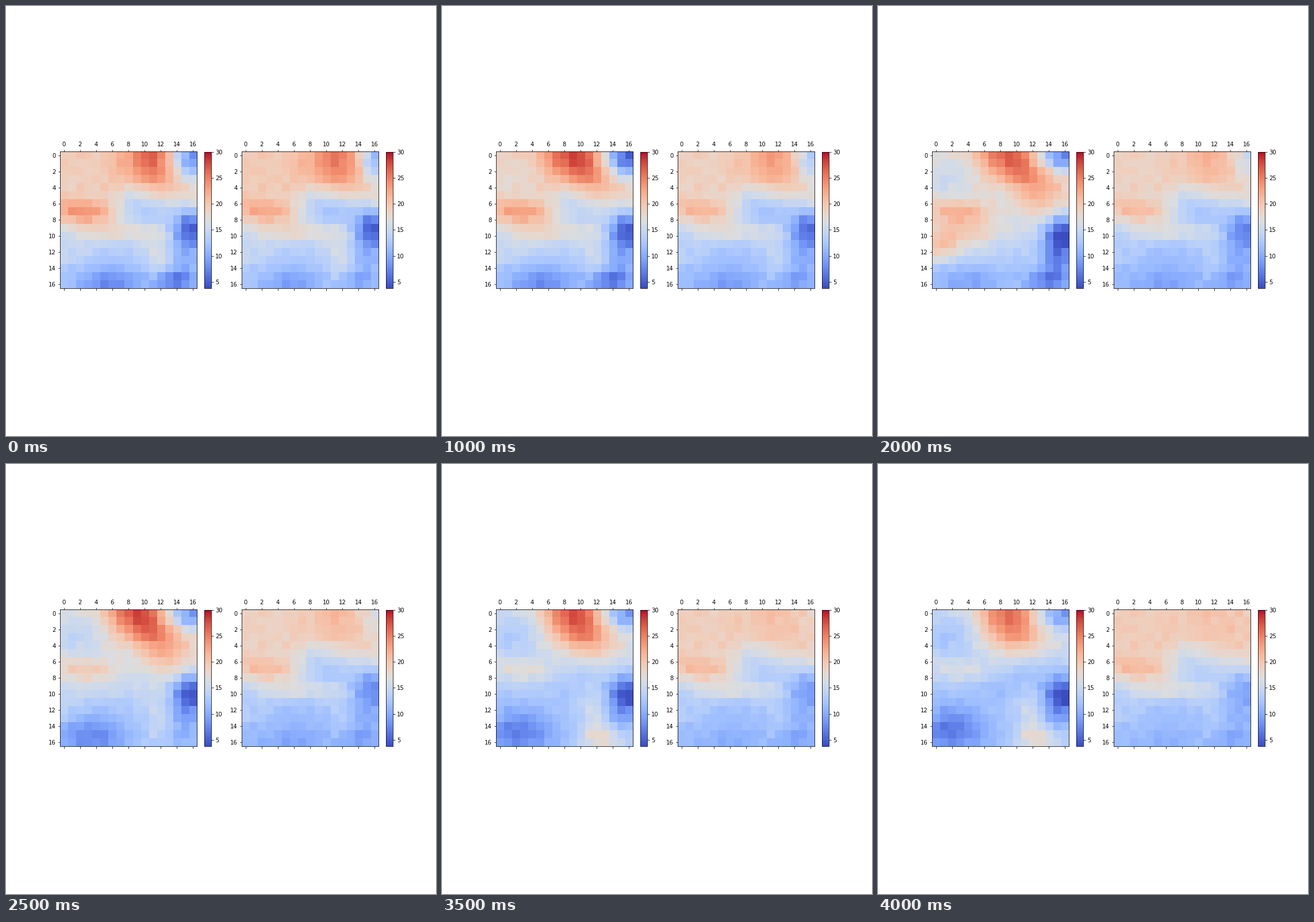
A matplotlib script for the animation above (4500 ms loop, 748 by 748 pixels).

```python
import numpy as np
import matplotlib.pyplot as plt
from matplotlib.animation import FuncAnimation

SIZE, DPI, N = 748, 72, 17
LAST = 7
VMIN, VMAX = 3.8, 30

rows, cols = np.mgrid[0:N, 0:N]
grain = np.random.default_rng(4).normal(0, 0.4, (N, N))


def ramp(a, b, t):
    return a + (b - a) * t


def rise(x):
    return 1 / (1 + np.exp(-x))


def pulse(step, peak, width):
    return np.exp(-0.5 * ((step - peak) / width) ** 2)


def spot(row, col, high, wide, tilt=0):
    """Soft unit bump; tilt shifts its centre sideways row by row."""
    dx = (cols - col - tilt * rows) / wide
    dy = (rows - row) / high
    return np.exp(-0.5 * (dx ** 2 + dy ** 2))


def ground(south, north):
    """Warm northern half fading into a cool southern half."""
    return south + (north - south) * rise((8 - rows) / 0.9) + grain


# Places that stay put in both maps
TROUGH = spot(6.8, 11.5, 1.5, 3)
NOTCH = spot(5.5, 8.5, 1.6, 1.3)
RIDGE = spot(9.5, 7, 0.9, 4)
WEST = spot(7.3, 2, 1.1, 2.8)
SHELF = spot(12, 1.5, 1.3, 2)
TONGUE = spot(13, 11.5, 2.3, 1.2)
EAST = spot(12.5, 15, 2, 1.3)
CORNER = spot(15.5, 13.3, 1, 2)


def left_map(step):
    t = step / LAST
    keys = [0, 1, 2, 3, 5, 7]

    def track(*values):
        return np.interp(step, keys, values)

    z = ground(ramp(13.5, 12.5, t), ramp(19.5, 15.3, t))

    # Hot core: swells, slides west and leans
    z += track(7.5, 9.5, 10.5, 9.5, 13, 11) * spot(
        0.5, track(11, 9, 8.7, 8.8, 9.2, 8.8), track(2.6, 2.6, 3.5, 3.2, 3.5, 3.3),
        2.6, track(0.1, 0.5, 0.7, 0.7, 0.5, 0.3))

    # Cold north-east corner and cooling north-west
    z += (ramp(-11, -7, t) - 4 * pulse(step, 1.5, 1)) * spot(
        0.3, 15.7, max(1.1, 2 - 0.3 * step), 1.9)
    z -= 3 * rise(step - 1.5) * spot(3, 1.5, 2, 2.2)

    # Middle band
    z += (ramp(-6, -4, t) + 6 * pulse(step, 3.2, 1.7)) * TROUGH
    z += ramp(-3, 0, t) * NOTCH + ramp(4, -1, t) * RIDGE
    z += ramp(6, 2, t) * WEST + ramp(1.5, -1, t) * SHELF

    # Brief warm spell in the south-west
    z += 9 * pulse(step, 2.2, 0.6) * spot(10.3, 4, 2.4, 2.8)
    z += 6 * pulse(step, 2.8, 0.7) * spot(11, 0.5, 1.5, 1.5)

    # South and east
    z += ramp(-10, -8.5, t) * spot(ramp(9, 10, t), 15.6, 1.5, 1.2)
    z -= (3 + 4 * pulse(step, 2.5, 0.8)) * EAST
    z += (12 * rise(2 * (step - 4)) - 7) * CORNER
    z += 3 * (1 - pulse(step, 2.5, 1)) * TONGUE
    z += (2.5 * pulse(step, 2.5, 0.7) - 6) * spot(
        ramp(16, 14.7, t), ramp(5.5, 2, t), 1.7, 3)
    return z


def right_map(step):
    t = (step / LAST) ** 0.6
    z = ground(ramp(13.5, 12, t), ramp(19.5, 19.3, t))
    z -= 0.7 * np.sin(np.pi * t)
    z += ramp(6, 1, t) * spot(0.8, 11.5, 2.4, 2.8)
    z += ramp(-9.5, 0, t) * spot(0.5, 16, 2, 1.5)
    z += ramp(-6, -3.5, t) * TROUGH - 2.5 * NOTCH + 4 * RIDGE
    z += ramp(4.5, 3.5, t) * WEST + 1.5 * SHELF
    z += ramp(-10, -4, t) * spot(9, 15.6, 1.5, 1.2)
    z += ramp(-3, -1.5, t) * EAST + ramp(-3.5, -2, t) * CORNER
    z += ramp(2.5, 1, t) * TONGUE
    z += ramp(-4.5, -1.5, t) * spot(16, 5.5, 1.7, 3)
    return z


plt.rcParams.update({"font.family": "DejaVu Sans", "font.size": 10})
fig, axes = plt.subplots(1, 2, figsize=(SIZE / DPI, SIZE / DPI), dpi=DPI,
                         facecolor="white")
fig.subplots_adjust(left=0.125, right=0.9, bottom=0.125, top=0.88, wspace=0.2)

makers = (left_map, right_map)
images = []
for ax, make in zip(axes, makers):
    im = ax.matshow(make(0), cmap="coolwarm", vmin=VMIN, vmax=VMAX)
    fig.colorbar(im, ax=ax, fraction=0.045, pad=0.05)
    images.append(im)


def update(frame):
    step = max(frame - 1, 0)  # the first map is held twice as long
    for im, make in zip(images, makers):
        im.set_data(make(step))
    return images


anim = FuncAnimation(fig, update, frames=LAST + 2, interval=500, repeat=True,
                     repeat_delay=0, blit=False)
plt.show()
```
